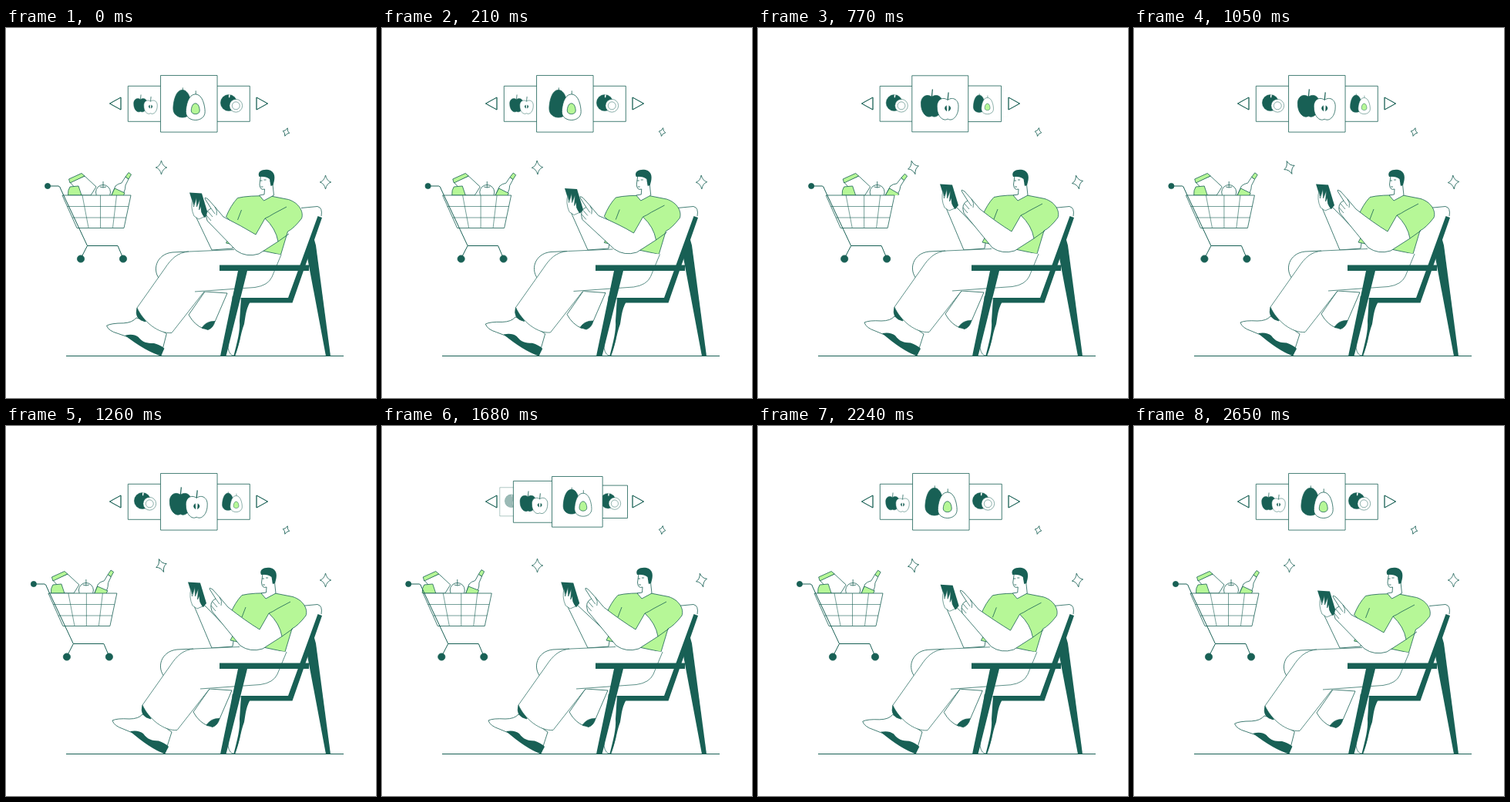
These frames come from a looping animation (480 px wide and 480 px high, 2720 ms). An HTML page with a canvas:

```html
<!DOCTYPE html>
<html lang="en">
<head>
<meta charset="utf-8">
<title>Online shopping</title>
<style>
  html, body { margin: 0; height: 100%; overflow: hidden; background: #fff; }
  canvas { display: block; }
</style>
</head>
<body>
<canvas id="stage" width="480" height="480"></canvas>
<script>
const g = document.getElementById('stage').getContext('2d');
const LOOP = 2720, STEP = 70;
const DARK = '#186055', LIME = '#b6f797', WHITE = '#fff', BLUE = '#a9bdf0';

// Eased value at time t along [time, value, time, value, ...]
function track(t, ...k) {
  for (let i = 0; i + 3 < k.length; i += 2) {
    if (t < k[i + 2]) {
      const u = Math.max(0, (t - k[i]) / (k[i + 2] - k[i]));
      return k[i + 1] + (k[i + 3] - k[i + 1]) * (1 - Math.cos(Math.PI * u)) / 2;
    }
  }
  return k[k.length - 1];
}

function shape(d, fill, stroke = DARK, width = 0.8) {
  const p = new Path2D(d);
  if (fill) { g.fillStyle = fill; g.fill(p); }
  if (stroke) { g.strokeStyle = stroke; g.lineWidth = width; g.stroke(p); }
}
const line = (d, width) => shape(d, null, DARK, width);
const solid = (d, color = DARK) => shape(d, color, null);

function circle(x, y, r, fill, stroke = DARK) {
  shape(`M${x - r},${y} a${r},${r} 0 1 1 ${2 * r},0 a${r},${r} 0 1 1 ${-2 * r},0Z`, fill, stroke);
}

function at(x, y, draw, angle = 0, scale = 1) {
  g.save();
  g.translate(x, y);
  g.rotate(angle);
  g.scale(scale, scale);
  draw();
  g.restore();
}

function egg(x, y, w, h, fill) {
  at(x, y, () => shape(`M0,${-h} C${w * .75},${-h} ${w},${-h * .1} ${w},${h * .35}
    C${w},${h * 1.2} ${-w},${h * 1.2} ${-w},${h * .35} C${-w},${-h * .1} ${-w * .75},${-h} 0,${-h}Z`, fill));
}

function apple(x, y, fill) {
  at(x, y, () => {
    shape('M0,-12 C7,-17 15,-12 14,-2 C14,8 7,17 0,13 C-7,17 -14,8 -14,-2 C-15,-12 -7,-17 0,-12Z', fill);
    line('M0,-12 L1,-22', 1.2);
  });
}

const fruits = {
  apples() {
    apple(-11, 3, DARK);
    apple(10, 7, WHITE);
    solid('M8.5,2 Q3,6 9,10Z M11.5,2 Q17,6 11,10Z');
  },
  avocado() {
    line('M-8,-21 V-17 M9,-17 V-12');
    egg(-8.5, 0, 12, 18, DARK);
    egg(8.5, 4.5, 12.5, 17, WHITE);
    egg(8.5, 6.5, 5.5, 7, LIME);
  },
  coconut() {
    circle(-7, -2, 17, DARK);
    solid('M-7,-19 l3,0 l-1,6 l-2,0Z', WHITE);
    circle(8, 4, 13.5, WHITE);
    circle(8, 4, 8, WHITE);
  }
};

function card(name, slot) {
  const a = Math.abs(slot), outer = Math.max(0, a - 1), inner = Math.min(1, a);
  const size = 73.5 - 27.5 * inner - 12.5 * outer;
  const x = 237.3 + Math.sign(slot) * (56 * inner + 14 * outer);
  g.globalAlpha = Math.min(1, Math.max(0, 1.5 * (2 - a)));
  at(x, 98.3, () => {
    shape(`M${-size / 2},${-size / 2} h${size} v${size} h${-size}Z`, WHITE);
    g.scale(size / 74, size / 74);
    fruits[name]();
  });
  g.globalAlpha = 1;
}

function arrow(x, dir, press) {
  at(x, 98, () => {
    const d = `M${dir * 7.5},0 L${-dir * 7},-8 V8Z`;
    shape(d, WHITE);
    g.globalAlpha = press;
    solid(d, BLUE);
    g.globalAlpha = 1;
    line(d);
  });
}

function carousel(t) {
  const p = track(t, 455, 0, 800, 1, 1459, 1, 1804, 0);
  const cards = [['apples', p - 1], ['avocado', p], ['coconut', 1 + p], ['coconut', p - 2]];
  cards.sort((a, b) => Math.abs(b[1]) - Math.abs(a[1])).forEach(c => card(...c));
  arrow(142, -1, track(t, 1360, 0, 1500, 1, 1640, 0));
  arrow(332, 1, track(t, 350, 0, 490, 1, 630, 0));
}

function sparkle(x, y, r, degrees) {
  const w = r * .8, q = r * .18;
  at(x, y, () => shape(`M0,${-r} Q${q},${-q} ${w},0 Q${q},${q} 0,${r}
    Q${-q},${q} ${-w},0 Q${-q},${-q} 0,${-r}Z`, WHITE), degrees * Math.PI / 180);
}

function sparkles(t) {
  sparkle(201.5, 181, 9, track(t, 0, 0, 490, -7, 1000, -22, 1260, -20, 1680, 0, 1960, -17, 2600, 0));
  sparkle(363.5, 135, 5.5, track(t, 0, 18, 490, 0, 770, 10, 1260, 18, 1680, 8, 1960, 10, 2600, 18));
  sparkle(414.5, 200, 9, track(t, 0, 0, 770, -13, 1260, 0, 1680, -14, 1960, -14, 2600, 0));
}

function groceries(sway) {
  shape('M83,200 L102,192 L117,206 L110,217 H98Z', WHITE);
  shape('M81.5,196 L98,188.5 L102,192 L83,201Z', LIME);
  shape('M83,206 Q80,210 80.5,217 H98 L94,205Z', LIME);
  circle(126, 213, 9.5, WHITE);
  line('M122,206 Q126,208 130,206 M126,207 V199');
  at(142, 217, () => {
    shape('M-6,2 L0,-12 Q3,-15 8,-16 L13,-24 L17,-21 L13,-13 Q13,-8 11,-4 L8,3Z', WHITE);
    shape('M-6,2 L-1,-9 L12,-3 L9,3Z', LIME);
    shape('M13,-24 L17,-29.5 L20.5,-27 L17,-21Z', LIME);
  }, sway * .007);
}

function cart(t) {
  const x = track(t, 0, 0, 520, 16, 700, 16.3, 1300, -18.5, 1620, -20.5, 2100, 0);
  const sway = track(t, 0, 0, 490, 12, 770, 13.5, 1260, -4, 1680, -8.5, 1960, -6, 2500, 0);
  at(x, 0, () => {
    g.save();
    g.beginPath();
    g.rect(40, 170, 150, 47);
    g.clip();
    at(sway, 0, () => groceries(sway));
    g.restore();
    shape('M73,217 H162 L153,259.5 H92Z', WHITE);
    line('M79,231.5 H159 M86,246 H156 M99,217 L107,259 M122.5,217 V259 M143.5,217 L138.5,259', .6);
    line('M54,205 H68 Q70,205 71,209 L105.5,282.5 H145 L152,299 M105.5,282.5 L97,299', 1);
    circle(54, 205, 3.6, DARK);
    circle(97, 299.5, 4.6, DARK);
    circle(152, 299.5, 4.6, DARK);
  });
}

function farLeg() {
  shape('M264,341 L243,371 Q250,384 262,389 L277,380 L293,343Z', WHITE);
  shape('M260,388 Q266,379 277,379.5 Q275,388 268,390.5Z', DARK);
  shape('M243,289 L222,290 C201,292 194,314 207,327 L230,310Z', WHITE);
}

function shoe() {
  shape('M177,374 Q172,380 160,380 Q144,379 138,382 Q140,389 152,393 L164,398 L206,425 L215,397 L188,378Z', WHITE);
  solid('M161,396 Q172,394 178,399 C184,407 189,408 198,408.5 Q206,411 211,416 L206,425.5 Q186,418 161,396Z');
}

function nearLeg() {
  const side = 'M303,286.5 L245,289 C229,290 221,299 213,311 L177,362 C185,380 205,396 222,394.5 L264,341';
  shape('M177,362 Q173,377 188,380 L186,370Z', DARK);
  solid(`${side} L330,335.5 Q347,333 352,322 L364,293Z`, WHITE);
  line(`${side} M252,341 L330,335.5 Q347,333 352,322 L364,293`, .7);
}

function torso() {
  shape(`M306,219.5 Q320,216 349,217 L372,221.5 C386,226 392,238 389,246
    Q379,259 371,263 L362,293 L291,278 L303,255 L291,244 Q297,229 306,219.5Z`, LIME);
  line('M311,235 L306,248');
}

function head() {
  shape('M333,192 L331.5,203 Q332,211 338,209 L337.5,216 L331,217 L337,224 L350,217 L348.5,203 L346,192Z', WHITE);
  solid('M331,193 C327,184 340,182 346,185 C353,189 351,197 349,204 L346,205 L344.5,196 Q339,192 331,193Z');
  line('M332,198 h3 M337,197 h3 M333,206 h3 M345,199 q3,-1 1,4', .8);
}

function farArm(px, py) {
  const move = (x, y) => `${x + px},${y + py}`;
  shape(`M${move(240, 216)} L${move(243, 231)} L267,288 L294,286 L296,272 L${move(258, 233)}Z`, WHITE);
  at(px, py, () => {
    solid('M236,202.5 L252,203.5 L260,230 L256,235 L248,230 L239,212Z');
    shape(`M240,211 Q237,222 242,233 L248,237 L255,234 Q250,228 251,220 L248.5,225
      L249.5,211 L245.5,221 L245,209 L241.5,221Z`, WHITE, DARK, .6);
  });
}

function nearArm(hx, hy, ex, ey) {
  const hand = (x, y) => `${x + hx},${y + hy}`;
  const elbow = (x, y) => `${x + ex},${y + ey}`;
  shape(`M${elbow(341, 243)} L${elbow(329, 264)} Q${elbow(311, 253)} ${hand(288, 235)}
    L${hand(277, 222)} L${hand(268, 212)} Q${hand(262, 208)} ${hand(265, 213)} L${hand(272, 224)}
    Q${hand(263, 228)} ${hand(267, 240)} L${elbow(304, 285)} Q${elbow(317, 294)} ${elbow(333, 289)}
    L${elbow(358, 273)} Q${elbow(355, 256)} ${elbow(341, 243)}Z`, WHITE);
  at(ex, ey, () => line('M341,243 Q346,241 352,237 L369,228 M358,273 L372,263'));
  at(hx, hy, () => line('M272,224 L277,231 M268,228 L274,235 M266,233 L272,240 M277,222 Q281,227 279,233', .7));
}

function chairBack() {
  line('M383,233.5 L404,231.5 Q411,233 409,244');
  solid('M404.5,244 L410,246 L371.5,356.5 H306 L316,350 H366Z');
  solid('M398,268 L402,282 L421,425.5 H415 L391,298Z');
}

function standingFoot() {
  shape('M294,348 L288,415 Q290,426 297,425 Q304,405 306,385 L308,352Z', WHITE, DARK, .7);
  solid('M305,350 H320 C311,363 311,373 309,384 C304,397 303,412 297,425 H295.5 C300,407 304,393 303,380Z');
}

function chairFront() {
  solid('M277,307.5 H393 V315 H313 L285.5,425.5 H278 L301,315 H277Z');
}

function draw(t) {
  const lean = track(t, 0, 1, 420, 0, 2030, 0, 2600, 1);
  const hx = track(t, 0, -6, 490, -9, 680, 0, 1330, 0, 1500, -9, 1700, 0, 2030, 0, 2600, -6);
  const hy = track(t, 0, 10, 490, 6, 680, 0, 1330, 0, 1500, 6, 1700, 0, 2030, 0, 2600, 10);
  const px = track(t, 0, 2, 420, 0, 1330, 0, 1650, -4, 1850, 0, 2030, 0, 2600, 2);

  g.fillStyle = WHITE;
  g.fillRect(0, 0, 480, 480);
  carousel(t);
  sparkles(t);
  cart(t);

  line('M78,425.5 H438', 1);
  standingFoot();
  chairBack();
  at(-6 * lean, lean, farLeg);
  farArm(px, 11 * lean);
  at(-5.5 * lean, lean, torso);
  at(-2.5 * lean, 0, head);
  at(207 - 5 * lean, 425, () => {
    g.translate(-207, -425);
    shoe();
  }, -.06 * lean);
  at(-7 * lean, lean, nearLeg);
  nearArm(hx, hy, -5 * lean, 4 * lean);
  chairFront();
}

const start = performance.now();
function frame() {
  const t = (performance.now() - start) % LOOP;
  draw(Math.floor(t / STEP) * STEP);
  requestAnimationFrame(frame);
}
frame();
</script>
</body>
</html>
```
